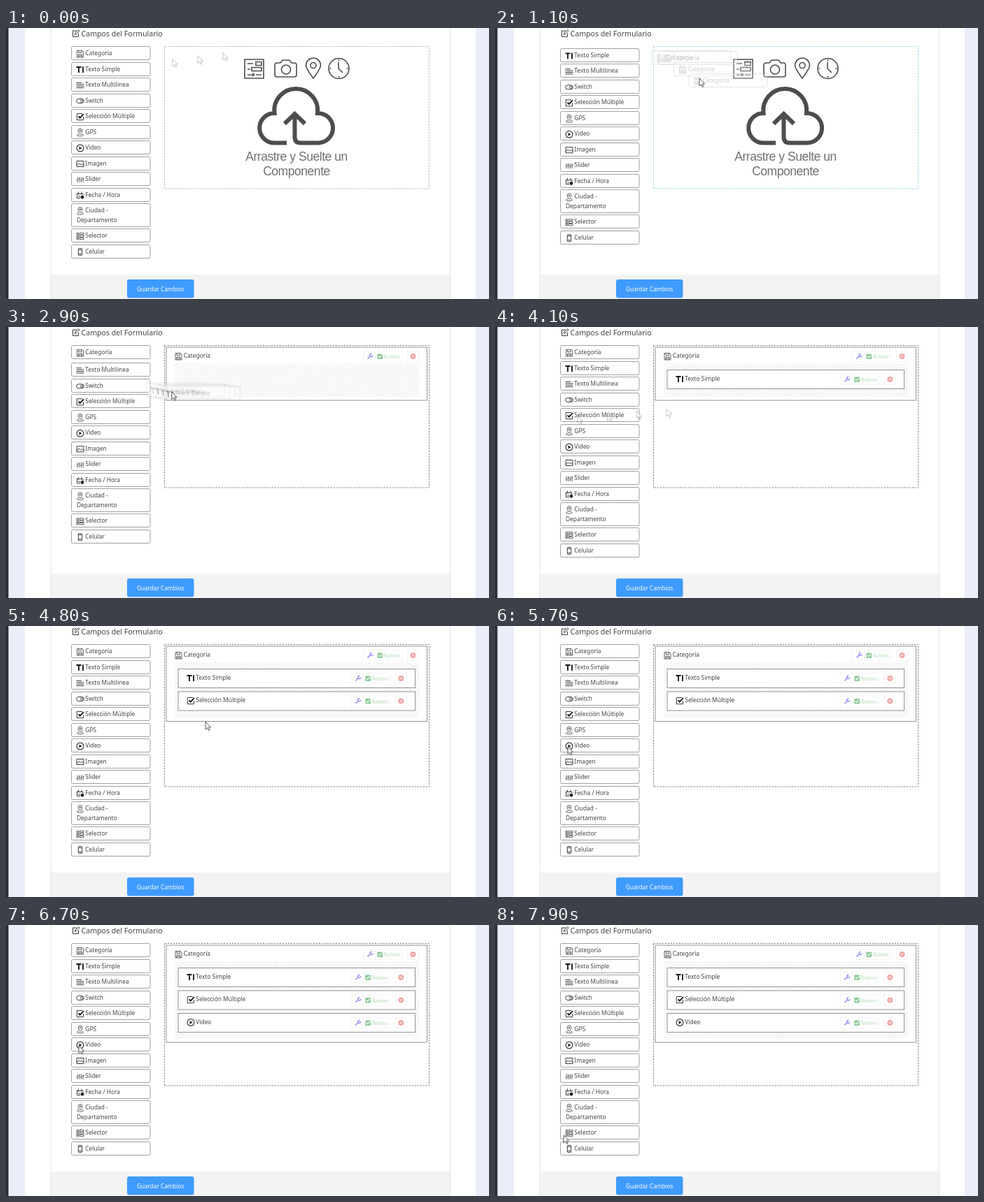
Recreate the animation shown at these times as an HTML page. Size 690x388 px, loop 8000 ms.

```html
<!DOCTYPE html>
<html lang="es">
<head>
<meta charset="utf-8">
<style>
html, body { margin: 0; width: 100%; height: 100%; overflow: hidden; background: #fff; }
svg { display: block; font: 8.4px "Noto Sans", sans-serif; fill: #444; }
.icon, .line { fill: none; stroke: #3a3a3a; }
.solid { fill: #222; stroke: none; }
.bold { stroke: #111; stroke-width: 1.8; }
.thin { stroke-width: .8; }
.hint { fill: none; stroke: #4d4d50; stroke-width: 1.6; }
.big { font: 17.5px "Liberation Sans", Arial, sans-serif; letter-spacing: -.45px; fill: #707072; text-anchor: middle; }
.active { font: 8.5px "Liberation Serif", serif; fill: #a3d3a8; }
</style>
</head>
<body>
<svg width="690" height="388" viewBox="0 0 690 388">
  <defs>
    <pattern id="hatch" width="12" height="3.6" patternUnits="userSpaceOnUse" patternTransform="rotate(-38)">
      <path d="M0 1.8q3-1.6 6 0t6 0" fill="none" stroke="#e4e4e4" stroke-width=".9"/>
    </pattern>
  </defs>
  <path d="M3 0H27V388H3zM671 0h19V388h-19z" fill="#ebedf8"/>
  <path d="M0 0H3.5V388H0z" fill="#2c2c36"/>
  <path d="M64 353H634V388H64z" fill="#f3f3f3"/>
  <path class="line" d="M64 0V388M634.5 0V388" style="stroke:#e3e3e6"/>
  <rect x="173" y="360" width="95.5" height="26.5" rx="3" fill="#3f9bff"/>
  <text x="220.7" y="376.5" text-anchor="middle" style="fill:#fff;font-size:8.2px;font-weight:500">Guardar Cambios</text>
  <path class="line" d="M101 4H95.5V12.5H103.5V8M98.5 9.5L99 7L103.5 2.5L105 4L100.7 8.7z"/>
  <text x="107.5" y="12" font-size="10.6">Campos del Formulario</text>
  <g id="scene"></g>
</svg>
<script>
const LOOP = 8000, STEP = 100, LIFT_DELAY = 150;
const ROW = 22.5, TALL_ROW = 36, LIST_TOP = 26.5, SLOT = 32.5;

const stroke = (d, cls = '') => `<path d="${d}" class="${cls}"/>`;
const repeat = (n, draw) => Array.from({ length: n }, (_, i) => draw(i)).join('');

const pin = stroke('M0 3Q-3-.5-3-2.500a3 3 0 0 1 6 0Q3-.5 0 3zM-2 2.5c-4 .7-3 2.7 2 2.7s6-2 2-2.7'.replace('2.500', '2.5'), 'thin') +
  '<circle cy="-2.3" r="1.1" class="thin"/>';

const fields = [
  ['Categoría', stroke('M-4.5-4.5H3L4.5-3V5H-4.5zM-2.5-4.5V-1.5H2V-4.5M-2.5 5V1H2.5V5M-2.5 3H2.5', 'thin')],
  ['Texto Simple', stroke('M-5.5-3.5H1.5M-2-3.5V4.5M4-4.3V4.5', 'bold')],
  ['Texto Multilinea', repeat(4, i => stroke(`M-5.5 ${i * 2.4 - 3.6}H${i ? 5.5 : 2}`))],
  ['Switch', '<rect x="-5.3" y="-3" width="10.6" height="6" rx="3"/><circle cx="2.3" r="1.7"/>'],
  ['Selección Múltiple', stroke('M4.5 0V4.7H-4.7V-4.5H3') + stroke('M-2.5-.7L-.3 1.7L5-4', 'bold')],
  ['GPS', pin],
  ['Video', '<circle r="4.9" stroke-width="1.2"/>' + stroke('M-1.5-2.5L2.5 0L-1.5 2.5z', 'solid')],
  ['Imagen', stroke('M-5-4H5V4H-5zM-5 2.5L-2-1L.5 1.5L2.5-.5L5 2.3')],
  ['Slider', repeat(4, i => stroke(`M${i * 2.7 - 4}-3.5v7.5m-1.2-${i % 2 ? 5 : 3}h2.4`, 'thin'))],
  ['Fecha / Hora', stroke('M-4.5-2H4V0M-4.5-3V4H0M-2.5-5V-2M2-5V-2M-3 1.5H0') + '<circle cx="3" cy="2.7" r="2.4" class="solid"/>'],
  ['Ciudad -', pin, 'Departamento'],
  ['Selector', repeat(3, i => stroke(`M-5 ${i * 3.4 - 4.5}h2.5v2.3h-2.5zm4 0h6v2.3h-6z`, 'thin'))],
  ['Celular', '<rect x="-2.7" y="-5" width="5.4" height="10" rx="1"/>' + stroke('M-2.7-3.2H2.7M-2.7 3H2.7')],
];

const drags = [
  { field: 0, press: 600, drop: 1400, via: [[1040, 249, 40], [1100, 292, 72]] },
  { field: 1, press: 2350, drop: 3100, via: [] },
  { field: 4, press: 4000, drop: 4800, via: [[4100, 245, 117]] },
  { field: 6, press: 5750, drop: 6300, via: [] },
];

const rowPoint = field => [104, LIST_TOP + field * ROW + 11];
const slotPoint = n => [285, 72 + n * SLOT];

// Pointer stops: time, x, y.
const stops = [
  [-60, 310, 35], [0, 238, 44],
  ...drags.flatMap(({ field, press, drop, via }, n) => [
    [press - 250, ...rowPoint(field)], [press, ...rowPoint(field)], ...via, [drop, ...slotPoint(n)],
  ]),
  [6600, ...rowPoint(6)], [6900, ...rowPoint(6)], [7400, 109, 243], [7600, 109, 243], [7900, 98, 301],
];

function pointerAt(t) {
  const i = stops.findIndex(stop => stop[0] >= t);
  const [t1, x1, y1] = stops[i];
  const [t0, x0, y0] = stops[i - 1] ?? [t1 - 1, x1, y1];
  const k = Math.max(0, (t - t0) / (t1 - t0));
  return [x0 + (x1 - x0) * k, y0 + (y1 - y0) * k];
}

const box = (x, y, w, h, color, extra = '') =>
  `<rect x="${x}" y="${y}" width="${w}" height="${h}" fill="#fff" stroke="${color}" ${extra}/>`;
const text = (x, y, s, cls = '') => `<text x="${x}" y="${y}" class="${cls}">${s}</text>`;
const label = (x, y, [name, icon]) =>
  `<g class="icon" transform="translate(${x} ${y + 1})">${icon}</g>` + text(x + 7.3, y + 3, name);

function card(x, y, field) {
  const second = field[2];
  return box(x, Math.floor(y) + .5, 112.5, second ? 33 : 19, '#a0a0a0', 'rx="2"') + label(x + 12.5, y + 9.5, field) +
    (second ? text(x + 7.5, y + 26.5, second) : '');
}

function list(dragged) {
  let y = LIST_TOP;
  return fields.map((field, i) => {
    const top = y;
    y += i === dragged ? 2.8 : field[2] ? TALL_ROW : ROW;
    return i === dragged ? '' : card(93.5, top, field);
  }).join('');
}

const controls = (x, y) => `<g transform="translate(${x} ${y})">
  ${box(-71, -7.5, 17, 15, '#f4f4f6')}${box(-54, -7.5, 38, 15, '#f4f4f6')}${box(-8, -7.5, 16, 15, '#f7f1f1')}
  <path d="M-65 3.5L-61-.5M-59-3.5a2 2 0 1 0 1.5 2" fill="none" stroke="#8f8ff0" stroke-width="1.5"/>
  <rect x="-51" y="-3.5" width="7.5" height="7.5" rx="1" fill="#8cc894"/>
  <path d="M-49.5 0l1.8 1.8l3-3.6" fill="none" stroke="#fff" stroke-width="1.2"/>
  ${text(-42.5, 3.3, 'Activo', 'active')}
  <circle r="4" fill="#f2a3a3"/><path d="M-1.5-1.5l3 3m0-3l-3 3" stroke="#fff"/></g>`;

const dropHint = `<g class="hint">
  <path d="M341 45h27v27h-27zM345 51h8M345 59h4M345 67h5M357 67h8M357 48.5h8v5h-8zM351 56.5h14v5h-14z"/><circle cx="353" cy="67" r="1.5"/>
  <path d="M387 50h5l3-4h10l3 4h4q3 0 3 3v14q0 3-3 3h-25q-3 0-3-3v-14q0-3 3-3z"/><circle cx="400" cy="59.5" r="6.5"/>
  <path d="M439 72C432 62 428.5 58 428.5 53.5a10.5 10.5 0 0 1 21 0C449.5 58 446 62 439 72z"/><circle cx="439" cy="53.5" r="4"/>
  <circle cx="475.5" cy="58" r="14.5"/><path d="M475 49V58L481 64M475.5 45v2M475.5 69v2M462.5 58h2M486.5 58h2"/>
  <path d="M401 164.5H383.5a21.3 21.3 0 0 1 0-42.6A31 31 0 1 1 445 121.9a21.3 21.3 0 0 1 1.5 42.6H421Q412.5 164.5 412.5 156V124M398 137L412.5 123L427 137" stroke-width="6"/></g>`
  + text(415, 190, 'Arrastre y Suelte un', 'big') + text(415, 211, 'Componente', 'big');

function form(dropped, dragging) {
  const empty = !dropped.length;
  const border = empty ? (dragging ? '#9fd3e6' : '#b3bac4') : '#858585';
  const area = box(226.5, 26.5, 378, 203.5, border, 'stroke-dasharray="2.5 1.5"');
  if (empty) return area + dropHint;
  const grow = Math.max(0, dropped.length - 2) * 31.5;
  return area + box(229, 29, 372.5, 76 + grow, '#929292') + label(246.5, 41, fields[0]) + controls(581.5, 42) +
    `<rect x="241" y="52" width="349" height="${48 + grow}" fill="url(#hatch)"/>` +
    dropped.slice(1).map((field, i) => {
      const y = 61.5 + i * SLOT;
      return box(246, y, 338.5, 27, '#929292') + label(264, y + 12, fields[field]) + controls(564.3, y + 13.5);
    }).join('');
}

const arrow = ([x, y], opacity) => `<path transform="translate(${x} ${y})" opacity="${opacity}"
  d="M0 0V11L2.5 8.7L4.2 12.5L6 11.7L4.3 8H7.5z" fill="#fff" stroke="#444" stroke-width=".9"/>`;

// Fast movement leaves a blended trail of the last few positions.
function pointer(t, dragged) {
  const samples = [90, 60, 30, 0].map(back => pointerAt(t - back));
  const now = samples[3];
  const fast = Math.hypot(now[0] - samples[0][0], now[1] - samples[0][1]) > 20;
  const trail = fast ? samples.filter((p, i) => !i || String(p) !== String(samples[i - 1])) : [now];
  if (dragged === undefined) return trail.map(p => arrow(p, fast ? .35 : 1)).join('');
  return trail.map(([x, y]) => `<g opacity=".27">${card(x - 15, y - 7, fields[dragged])}</g>`).join('') + arrow(now, 1);
}

const scene = document.getElementById('scene');
let shown = -1;
function draw() {
  const t = Math.floor(performance.now() % LOOP / STEP) * STEP;
  if (t !== shown) {
    shown = t;
    const dragged = drags.find(d => t >= d.press + LIFT_DELAY && t < d.drop)?.field;
    const dropped = drags.filter(d => t >= d.drop).map(d => d.field);
    scene.innerHTML = list(dragged) + form(dropped, dragged !== undefined) + pointer(t, dragged);
  }
  requestAnimationFrame(draw);
}
draw();
</script>
</body>
</html>
```
